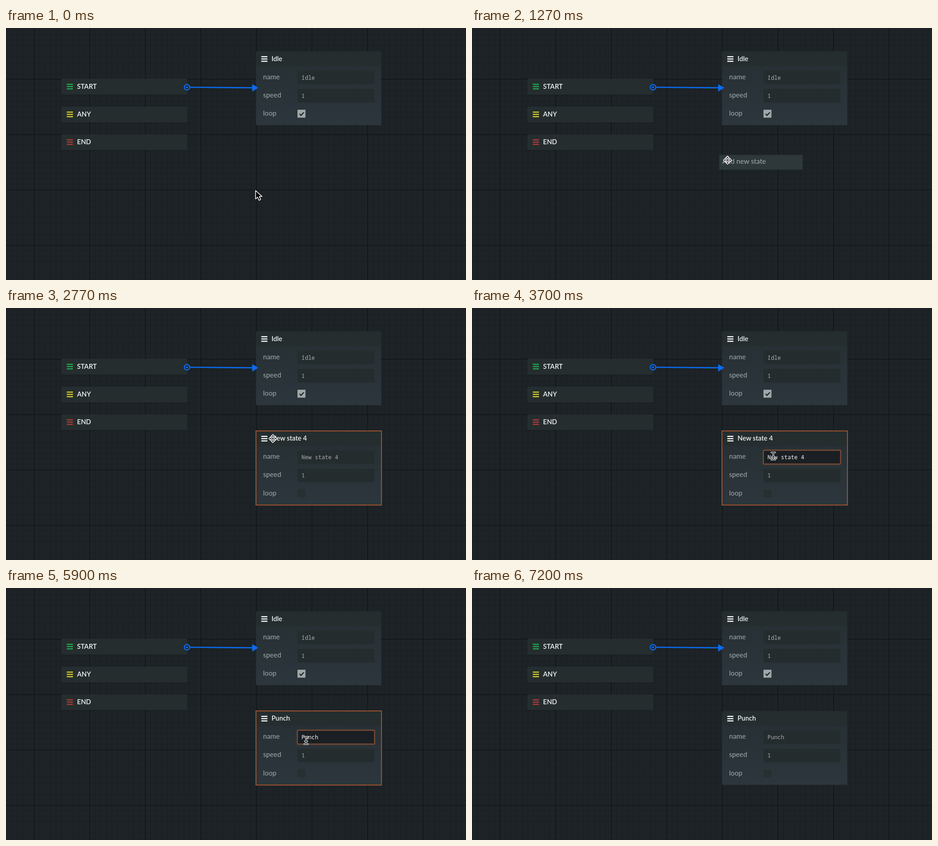
Animation of 1010x555 px, one loop 7.81 s. Source, as an HTML page:

```html
<!DOCTYPE html>
<html lang="en">
<head>
<meta charset="utf-8">
<title>State graph</title>
<style>
  html, body { margin: 0; width: 100%; height: 100%; overflow: hidden; background: #1d2327; }
  svg { display: block; width: 1010px; height: 555px; }
  text { font-family: Lato, sans-serif; white-space: pre; }
  .title { font-size: 14.6px; font-weight: 600; fill: #f2f4f4; }
  .label { font-size: 15.2px; fill: #a4aaad; }
  .value { font-family: "Noto Sans Mono", monospace; font-size: 12.25px; fill: #a9afb0; }
</style>
</head>
<body>
<svg id="stage" viewBox="0 0 1010 555"></svg>
<script>
const LOOP = 7810;
const BLUE = '#0b6cf0', ORANGE = '#bd5c2e';
const FIELD = [91, 42.5, 169, 30];
const HEADER = 32.5, NODE_W = 275, NODE_H = 162.5;
const MENU = [543, 279.5, 183, 32.5];

const rect = (x, y, w, h, attrs) =>
  `<rect x="${x}" y="${y}" width="${w}" height="${h}" ${attrs}/>`;
const text = (x, y, cls, str, attrs = '') =>
  `<text x="${x}" y="${y}" class="${cls}" ${attrs}>${str}</text>`;
const icon = (x, y, color) =>
  [-6.2, -1.2, 3.8].map(dy => rect(x, y + dy, 13.5, 2.5, `fill="${color}"`)).join('');

function gridPattern(id, size, color, width) {
  return `<pattern id="${id}" x="61" y="112" width="${size}" height="${size}" patternUnits="userSpaceOnUse">
    <path d="M0 ${width / 2}H${size}M${width / 2} 0V${size}" stroke="${color}" stroke-width="${width}"/></pattern>`;
}

function bar(y, h, label, color) {
  return rect(122.5, y, 274.5, h, 'fill="#252d2f" stroke="#293234" stroke-width="1"')
    + icon(133.5, y + 16.2, color) + text(156, y + 21.3, 'title', label);
}

function node(id, name, checked) {
  const [fx, fy, fw, fh] = FIELD;
  const labels = ['name', 'speed', 'loop']
    .map((s, i) => text(15.5, 61 + i * 40.3, 'label', s)).join('');
  const check = checked
    ? rect(fx, 128.5, 17.5, 17.5, 'fill="#a1a6a7"')
      + '<path d="M95.5 137.5l3.2 3.4 6.3-6.7" fill="none" stroke="#20272a" stroke-width="2.4"/>'
    : rect(fx, 128.5, 17.5, 17.5, 'rx="1" fill="#272f31"');
  return `<g id="${id}">
    ${rect(0, 0, NODE_W, NODE_H, 'fill="url(#body)" opacity=".95"')}
    ${rect(0, 0, NODE_W, HEADER, 'fill="#252d2f"')}
    ${icon(11.5, 16.7, '#f4f6f6')}
    ${text(34, 21.4, 'title', name, 'data-part="title"')}
    ${labels}
    ${rect(fx, fy, fw, fh, 'fill="#242c2e"')}
    <g data-part="focus">
      ${rect(fx - .5, fy - .5, fw + 1, fh + 1, 'rx="2" fill="none" stroke="#a8542c" stroke-width="4" opacity=".22"')}
      ${rect(fx, fy, fw, fh, 'rx="1.5" fill="#1a1f23" stroke="#96563a" stroke-width="1.4"')}
    </g>
    ${rect(fx + 9, fy + 6.5, 81, 17, 'fill="#3f5f86" data-part="selection"')}
    ${text(fx + 8.8, 62, 'value', name, 'data-part="value"')}
    ${rect(fx + 9, fy + 7.5, 1.2, 15, 'fill="#fff" data-part="caret"')}
    ${rect(fx, fy + 40.3, fw, fh, 'fill="#242c2e"')}
    ${text(fx + 8.8, 102.3, 'value', '1')}
    ${check}
    ${rect(-.2, -.3, NODE_W + .6, NODE_H + .8, `fill="none" stroke="${ORANGE}" stroke-width="1.6" data-part="outline"`)}
  </g>`;
}

const cursors = `<g id="pointer" stroke-linejoin="round">
  <path data-kind="arrow" d="M0 0V18.5L4.4 14.5L7.6 21.5L11.2 19.9L8.1 13.1H14.2Z"
    fill="#050505" stroke="#fff" stroke-width="1.5"/>
  <path data-kind="move" d="M0-9L4-5H1.3V-1.3H5V-4L9 0L5 4V1.3H1.3V5H4L0 9L-4 5H-1.3V1.3H-5V4L-9 0L-5-4V-1.3H-1.3V-5H-4Z"
    fill="#050505" stroke="#fff" stroke-width="1.5"/>
  <g data-kind="beam" fill="none" stroke-linecap="round">
    ${['#fff" stroke-width="3.4', '#111" stroke-width="1.3'].map(s =>
      `<path d="M-4-8Q0-8 0-5Q0-8 4-8M0-5V5M-4 8Q0 8 0 5Q0 8 4 8M-2.5 2H2.5" stroke="${s}"/>`).join('')}
  </g>
</g>`;

const stage = document.getElementById('stage');
stage.innerHTML = `<defs>
    ${gridPattern('minor', 12.2, '#191e22', 1)}
    ${gridPattern('major', 122, '#101518', 1.5)}
    <linearGradient id="body" x2="0" y2="1">
      <stop offset=".2" stop-color="#283135"/><stop offset="1" stop-color="#2d373e"/>
    </linearGradient>
  </defs>
  ${rect(0, 0, 1010, 555, 'fill="#1d2327"')}
  ${rect(0, 0, 1010, 555, 'fill="url(#minor)"')}
  ${rect(0, 0, 1010, 555, 'fill="url(#major)"')}
  ${bar(112.7, 33, 'START', '#20a94c')}
  ${bar(174, 32.5, 'ANY', '#d0ca2c')}
  ${bar(235, 32.5, 'END', '#ab3b38')}
  ${node('idle', 'Idle', true)}
  <path d="M404 130.5L543 131.7" stroke="${BLUE}" stroke-width="2.7"/>
  <path d="M540.5 123.5V140L554 131.7Z" fill="${BLUE}"/>
  <circle cx="397.6" cy="130.5" r="6" fill="#1d2327" stroke="${BLUE}" stroke-width="2.4"/>
  <circle cx="397.6" cy="130.5" r="2.3" fill="${BLUE}"/>
  ${node('added', 'New state 4', false)}
  <g id="menu">${rect(...MENU, 'fill="#2e383b"')}${text(549.5, 299.3, 'label', 'Add new state')}</g>
  ${cursors}`;

const byId = id => document.getElementById(id);
const parts = id => Object.fromEntries(
  [...byId(id).querySelectorAll('[data-part]')].map(el => [el.dataset.part, el]));
const show = (el, on) => el.setAttribute('visibility', on ? 'visible' : 'hidden');
const place = (el, x, y) => el.setAttribute('transform', `translate(${x} ${y})`);
const ramp = (t, a, b) => Math.min(1, Math.max(0, (t - a) / (b - a)));
const ease = u => u * u * (3 - 2 * u);
const inside = (x, y, [l, t, w, h]) => x >= l && x <= l + w && y >= t && y <= t + h;

// time, x, y
const path = [
  [30, 548, 358], [430, 543, 280], [520, 543, 280], [770, 564, 299],
  [1200, 564, 299], [1270, 561, 291], [1800, 561, 291], [1970, 591, 303],
  [2130, 591, 303], [2200, 582, 297], [2330, 577, 283], [2670, 577, 283],
  [3170, 661.5, 326], [5830, 661.5, 326], [6270, 623, 466], [6430, 623, 466],
  [6600, 617, 478], [6900, 617, 478], [6970, 618, 506]
];
const typing = [[4170, 'P'], [4470, 'Pu'], [4600, 'Pun'], [4830, 'Punc'], [4900, 'Punch']];

function pointerAt(t) {
  const next = path.findIndex(k => k[0] > t);
  if (next === 0) return path[0].slice(1);
  if (next < 0) return path[path.length - 1].slice(1);
  const [t0, x0, y0] = path[next - 1], [t1, x1, y1] = path[next];
  const u = ease(ramp(t, t0, t1));
  return [x0 + (x1 - x0) * u, y0 + (y1 - y0) * u];
}

const added = byId('added'), menu = byId('menu'), pointer = byId('pointer');
const addedParts = parts('added'), idleParts = parts('idle');
const kinds = [...pointer.children];
place(byId('idle'), 549, 51.5);
for (const key of ['focus', 'selection', 'caret', 'outline']) show(idleParts[key], false);

function render(t) {
  const menuOpen = t >= 470 && t < 1300;
  const exists = t >= 1300;
  const [nx, ny] = t < 2270 ? [561, 289.5] : [549, 271];

  show(menu, menuOpen);
  added.style.display = exists ? '' : 'none';
  place(added, nx, ny);

  const typed = typing.filter(k => k[0] <= t).pop();
  const value = typed ? typed[1] : 'New state 4';
  const focus = ramp(t, 3170, 3370) * (1 - ramp(t, 6250, 6430));
  const { title, focus: glow, selection, value: field, caret, outline } = addedParts;
  title.textContent = t < 5230 ? 'New state 4' : 'Punch';
  field.textContent = value;
  const tone = Math.round(172 + 76 * focus);
  field.style.fill = `rgb(${tone},${tone},${tone})`;
  glow.setAttribute('opacity', focus);
  show(selection, t >= 3760 && t < 4170);
  show(caret, t >= 4170 && t < 5330);
  caret.setAttribute('x', FIELD[0] + 8.8 + value.length * 7.35);
  outline.setAttribute('opacity', 1 - ramp(t, 6330, 6450));

  const [x, y] = pointerAt(t);
  const [fx, fy, fw, fh] = FIELD;
  const overField = exists && inside(x, y, [nx + fx, ny + fy, fw, fh]);
  const overHandle = menuOpen ? inside(x, y, MENU)
    : exists && inside(x, y, [nx, ny, NODE_W, HEADER]);
  const kind = overField ? 'beam' : overHandle ? 'move' : 'arrow';
  place(pointer, x, y);
  pointer.style.display = t < 4000 || (t >= 5830 && t < 6970) ? '' : 'none';
  for (const el of kinds) show(el, el.dataset.kind === kind);
}

const start = performance.now();
function tick() {
  render((performance.now() - start) % LOOP);
  requestAnimationFrame(tick);
}
tick();
</script>
</body>
</html>
```
